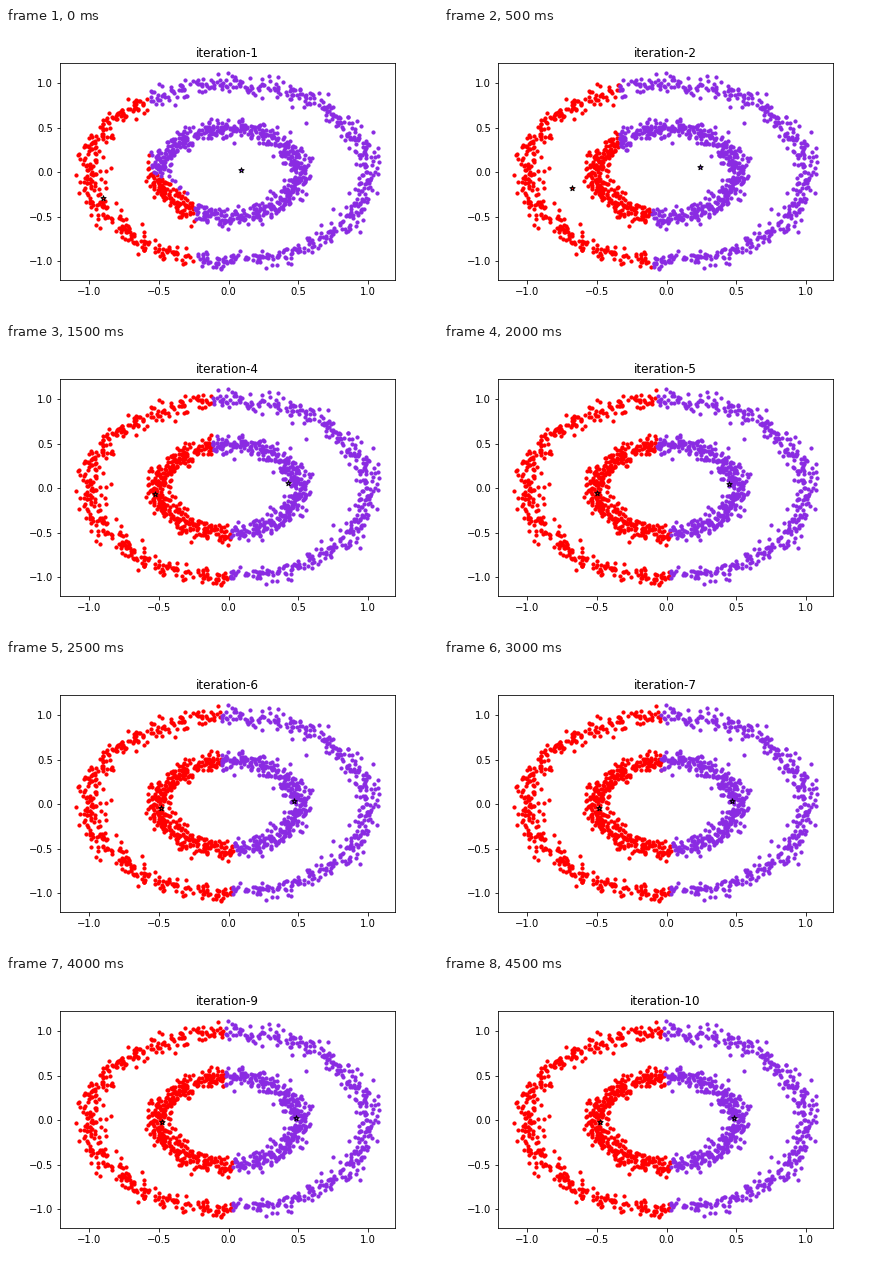
Recreate the animation shown at these times as a matplotlib script. Size 432x288 px, loop 5 s.

```python
import numpy as np
import matplotlib.pyplot as plt
from matplotlib.animation import FuncAnimation

COLORS = ("red", "blueviolet")
STEPS = 10
START = np.array([(-0.900, -0.290), (0.088, 0.030)])


def make_rings(count=1500, factor=0.5, noise=0.05, seed=0):
    rng = np.random.RandomState(seed)
    angle = np.linspace(0, 2 * np.pi, count // 2, endpoint=False)
    ring = np.column_stack([np.cos(angle), np.sin(angle)])
    points = np.vstack([ring, ring * factor])
    order = np.arange(count)
    rng.shuffle(order)
    return points[order] + rng.normal(scale=noise, size=points.shape)


def assign(points, centres):
    """Index of the nearest centre by city-block distance."""
    gaps = np.abs(points[:, None] - centres[None]).sum(axis=2)
    return gaps.argmin(axis=1)


def cluster(points, centres, steps):
    """Centres and labels at each step; centres move to their cluster means."""
    history = []
    for _ in range(steps):
        labels = assign(points, centres)
        history.append((centres, labels))
        centres = np.array([points[labels == k].mean(axis=0) for k in range(2)])
    return history


points = make_rings()
history = cluster(points, START, STEPS)

plt.rcParams["font.family"] = "DejaVu Sans"
fig = plt.figure(figsize=(6, 4), dpi=72, facecolor="white")
ax = fig.add_axes([0.125, 0.125, 0.775, 0.755])
ax.set_xlim(-1.206, 1.190)
ax.set_ylim(-1.210, 1.232)
ax.set_xticks(np.arange(-1, 1.1, 0.5))
ax.set_yticks(np.arange(-1, 1.1, 0.5))
title = ax.set_title("", fontsize=12)
clouds = [ax.scatter([], [], s=10, c=c, linewidths=1) for c in COLORS]
stars = [ax.scatter([], [], s=30, c=c, marker="*", edgecolors="black",
                    linewidths=1, zorder=3) for c in COLORS]


def draw(step):
    centres, labels = history[step]
    for k in range(2):
        clouds[k].set_offsets(points[labels == k])
        stars[k].set_offsets(centres[k:k + 1])
    title.set_text(f"iteration-{step + 1}")
    return [*clouds, *stars, title]


anim = FuncAnimation(fig, draw, frames=STEPS, interval=500,
                     repeat=True, repeat_delay=0, blit=False)
plt.show()
```
